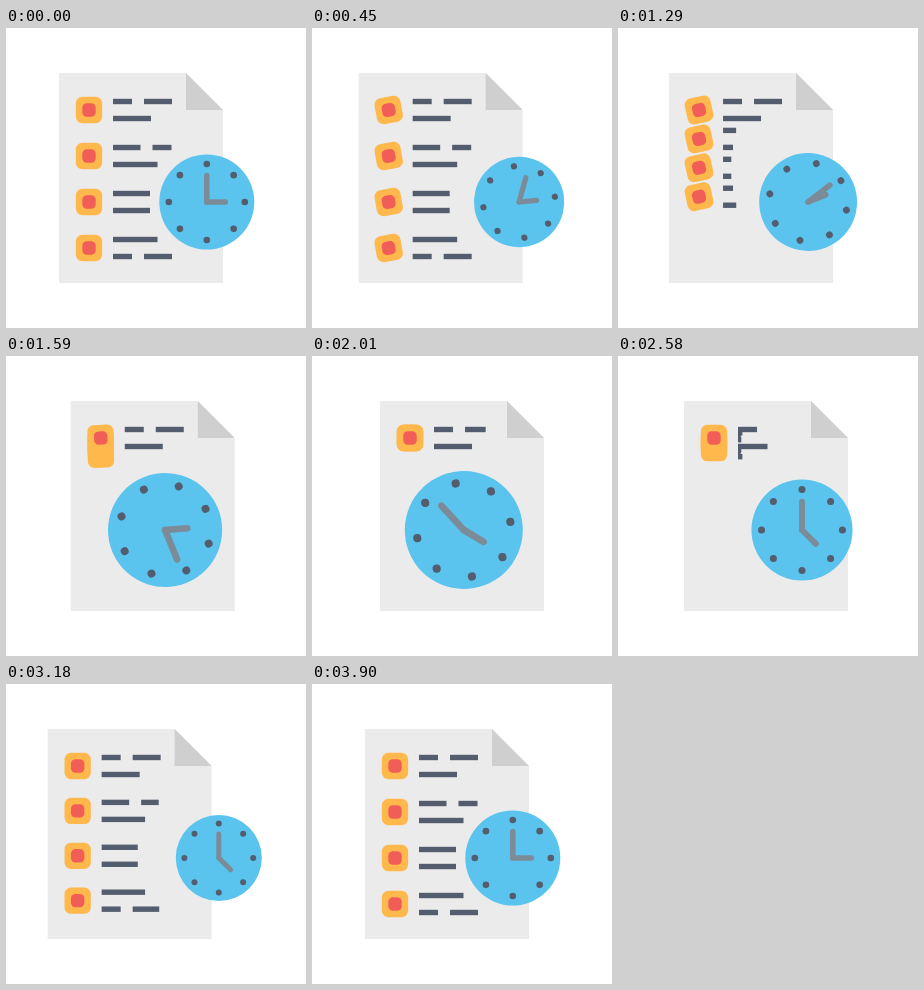
Recreate the animation shown at these times as an HTML page with a canvas. Size 300 px wide and 300 px high, loop 5310 ms.

```html
<!DOCTYPE html>
<html lang="en">
<head>
<meta charset="utf-8">
<title>Checklist and clock</title>
<style>
  html, body { margin: 0; width: 100%; height: 100%; overflow: hidden; background: #fff; }
  canvas { display: block; width: 100vmin; height: 100vmin; }
</style>
</head>
<body>
<canvas id="stage"></canvas>
<script>
const SIZE = 300, LOOP = 5310, STEP = 30, MOVE = 810;
const PAPER = '#ebebeb', FOLD = '#cfcfcf', INK = '#535d6e';
const ORANGE = '#ffb84c', RED = '#f15e57', BLUE = '#5ac4ee', HAND = '#7c8b98';

// Dash lengths of the two lines in each row.
const DASH_GAP = 12;
const rows = [
  [[19, 28], [38]],
  [[27.5, 19], [44.5]],
  [[37], [37]],
  [[44.5], [19, 28]]
];

const canvas = document.getElementById('stage');
const ctx = canvas.getContext('2d');
const rad = deg => deg * Math.PI / 180;
const lineWidth = dashes => dashes.reduce((sum, d) => sum + DASH_GAP + d, -DASH_GAP);

// Eased progress from 0 to 1.
function ramp(t, start, duration = MOVE) {
  const u = Math.min(1, Math.max(0, (t - start) / duration));
  return u * u * (3 - 2 * u);
}

function poseAt(t) {
  const part = ramp(t, 30), gather = ramp(t, 955);
  const spread = ramp(t, 2445), settle = ramp(t, 3270, 630);
  const apart = part - settle;
  const stacked = gather - spread;
  const over = gather - ramp(t, 2160);
  const minute = 45 * part + 315 * ramp(t, 1010, 1250);
  return {
    paperX: 53 - 12 * apart + 27 * stacked,
    gap: 46 * (1 - stacked),
    tilt: -20 * (part - gather),
    trim: 1 - ramp(t, 950, 490) + spread,
    firstWidth: 59 * (1 - ramp(t, 1900, 500) + ramp(t, 2400, 360)),
    clockX: 200.8 + 12 * apart - 61 * over,
    clockR: 47.5 - 4.5 * apart + 16 * over,
    dial: -33 * (ramp(t, 30, 1280) - ramp(t, 1310, 1100)),
    minute,
    hour: 90 + minute / 8 - 45 * settle
  };
}

function polygon(color, ...points) {
  ctx.fillStyle = color;
  ctx.beginPath();
  points.forEach(([x, y]) => ctx.lineTo(x, y));
  ctx.fill();
}

function disc(x, y, r, color) {
  ctx.fillStyle = color;
  ctx.beginPath();
  ctx.arc(x, y, r, 0, 2 * Math.PI);
  ctx.fill();
}

function roundSquare(size, radius, color) {
  ctx.fillStyle = color;
  ctx.beginPath();
  ctx.roundRect(-size / 2, -size / 2, size, size, radius);
  ctx.fill();
}

function drawIcon(x, y, tilt) {
  ctx.save();
  ctx.translate(x, y);
  ctx.rotate(rad(tilt));
  roundSquare(26.3, 6.5, ORANGE);
  roundSquare(13.4, 4.5, RED);
  ctx.restore();
}

function drawLine(dashes, x, y, visible) {
  ctx.fillStyle = INK;
  let start = 0;
  for (const length of dashes) {
    const w = Math.min(length, visible - start);
    if (w > 0) ctx.fillRect(x + start, y - 2.7, w, 5.4);
    start += length + DASH_GAP;
  }
}

function drawPaper(p) {
  const x = p.paperX, right = x + 164, foldX = right - 37;
  polygon(PAPER, [x, 45], [foldX, 45], [right, 82], [right, 255], [x, 255]);
  polygon(FOLD, [foldX, 45], [right, 82], [foldX, 82]);
  // Upper rows cover the lower ones when stacked.
  for (let i = rows.length - 1; i >= 0; i--) {
    const y = 82 + i * p.gap;
    rows[i].forEach((dashes, k) => {
      const visible = i ? lineWidth(dashes) * p.trim : p.firstWidth;
      drawLine(dashes, x + 54, y + (k ? 8.5 : -8.5), visible);
    });
    drawIcon(x + 30, y, p.tilt);
  }
}

function drawHand(angle, length) {
  ctx.beginPath();
  ctx.moveTo(0, 0);
  ctx.lineTo(length * Math.sin(rad(angle)), -length * Math.cos(rad(angle)));
  ctx.stroke();
}

function drawClock(p) {
  ctx.save();
  ctx.translate(p.clockX, 174);
  ctx.scale(p.clockR / 47.5, p.clockR / 47.5);
  ctx.rotate(rad(p.dial));
  disc(0, 0, 47.5, BLUE);
  for (let i = 0; i < 8; i++) {
    const a = i * Math.PI / 4;
    disc(38 * Math.cos(a), 38 * Math.sin(a), 3.3, INK);
  }
  ctx.strokeStyle = HAND;
  ctx.lineWidth = 5.5;
  ctx.lineCap = 'round';
  drawHand(p.minute, 26.5);
  drawHand(p.hour, 18.5);
  ctx.restore();
}

function resize() {
  const side = Math.min(innerWidth, innerHeight) * devicePixelRatio;
  canvas.width = canvas.height = Math.round(side);
}

function draw(now) {
  const pose = poseAt(Math.floor((now % LOOP) / STEP) * STEP);
  const scale = canvas.width / SIZE;
  ctx.setTransform(scale, 0, 0, scale, 0, 0);
  ctx.fillStyle = '#fff';
  ctx.fillRect(0, 0, SIZE, SIZE);
  drawPaper(pose);
  drawClock(pose);
}

let begin;
function tick(now) {
  begin ??= now;
  draw(now - begin);
  requestAnimationFrame(tick);
}

addEventListener('resize', resize);
resize();
draw(0);
requestAnimationFrame(tick);
</script>
</body>
</html>
```
